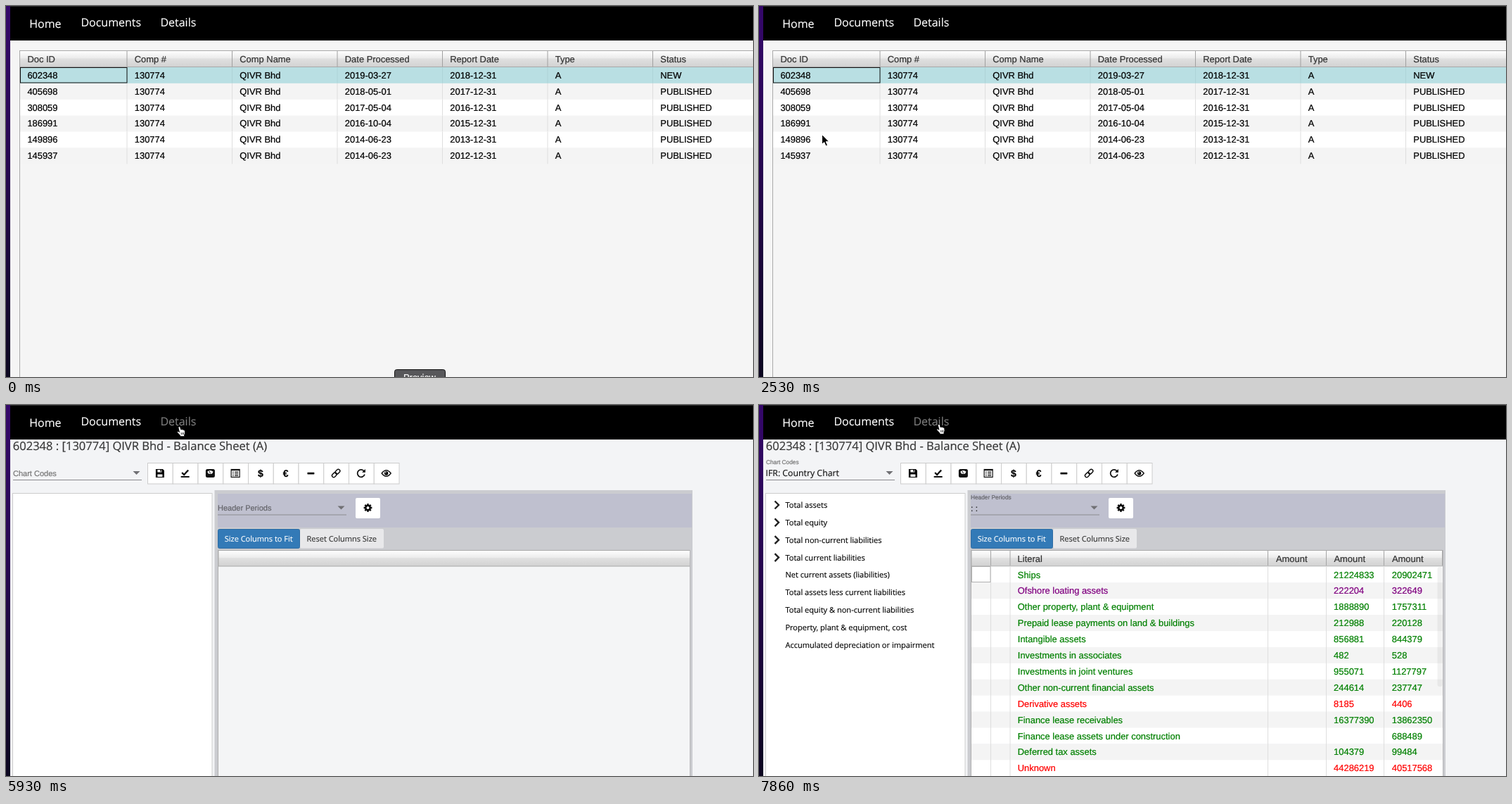
An HTML page that plays this animation: 1062 by 527 pixels, repeating every 8 s.

```html
<!DOCTYPE html>
<html lang="en">
<head>
<meta charset="utf-8">
<title>Document list</title>
<style>
html, body { margin: 0; width: 100%; height: 100%; overflow: hidden; background: #f5f5f5; }
svg { display: block; width: 1062px; height: 527px; }
text {
  font-family: "Liberation Sans", Arial, sans-serif; font-size: 12.92px; white-space: pre;
  color: #000; fill: currentColor; stroke: currentColor; stroke-width: .22px;
  text-rendering: geometricPrecision;
}
.o { font-family: "Open Sans", "Noto Sans", sans-serif; stroke-width: .15px; }
</style>
</head>
<body>
<svg id="stage" viewBox="0 0 1062 527" xmlns="http://www.w3.org/2000/svg">
  <defs>
    <linearGradient id="head" x2="0" y2="1">
      <stop offset="0" stop-color="#fff"/><stop offset=".45" stop-color="#ececec"/>
      <stop offset=".5" stop-color="#e0e0e0"/><stop offset="1" stop-color="#d2d2d2"/>
    </linearGradient>
    <linearGradient id="strip" x2="0" y2="1">
      <stop offset="0" stop-color="#35086a"/><stop offset=".45" stop-color="#26064f"/><stop offset="1" stop-color="#0c0620"/>
    </linearGradient>
  </defs>
  <g id="list"></g>
  <g id="details"></g>
  <g id="nav"></g>
  <path id="arrow" d="M0 0V14L3.2 11.1 5.5 16.4 8 15.3 5.7 10.2H10Z" fill="#000" stroke="#fff" stroke-width="1" stroke-linejoin="round"/>
  <g id="hand" stroke="#000" stroke-width=".9" stroke-linejoin="round">
    <path d="M3 1.2Q4.6 .2 5.2 2L6.1 5.2Q7.5 4.4 8.2 5.3 9.4 4.7 10 5.8 11.6 5.5 11.8 7.4L12 10.5 11 12.8V15H5.2L4.8 13.4 1.2 9.6Q.2 8.2 1.4 7.7 2.4 7.4 3.9 9L2.4 2.8Q2.2 1.6 3 1.2Z" fill="#fff"/>
    <path d="M6.4 9.5L6.8 12.5M8.3 9.3L8.5 12.4M10 9.2V12.2" fill="none" stroke-width=".7"/>
  </g>
</svg>
<script>
const $ = id => document.getElementById(id);
const LOOP = 8000, ROW = 22.9;
const COMPANY = "QIVR Bhd";

const rect = (x, y, w, h, fill, more = "") =>
  `<rect x="${x}" y="${y}" width="${w}" height="${h}" fill="${fill}" ${more}/>`;
const label = (x, y, s, more = "") =>
  `<text x="${x}" y="${y}" ${more}>${s.replace(/&/g, "&amp;")}</text>`;
const open = (x, y, s, size, color) => label(x, y, s, `class="o" style="font-size:${size}px;color:${color}"`);
const small = (x, y, s, size, color) => label(x, y, s, `style="font-size:${size}px;color:${color}"`);
const line = (x1, y1, x2, y2, color) => `<path d="M${x1} ${y1}L${x2} ${y2}" stroke="${color}"/>`;

function drawNav() {
  return rect(0, 0, 6, 527, "url(#strip)") + rect(6, 0, 1056, 49, "#000") + line(6, .5, 1062, .5, "#2c2c2c") +
    open(33.2, 31.2, "Home", 16, "#fff") + open(106.4, 29.3, "Documents", 16, "#fff") +
    `<g id="link">${open(219.4, 29.3, "Details", 16, "inherit")}</g>`;
}

function drawList() {
  const heads = ["Doc ID", "Comp #", "Comp Name", "Date Processed", "Report Date", "Type", "Status"];
  const docs = [
    ["602348", "2019-03-27", "2018-12-31"], ["405698", "2018-05-01", "2017-12-31"],
    ["308059", "2017-05-04", "2016-12-31"], ["186991", "2016-10-04", "2015-12-31"],
    ["149896", "2014-06-23", "2013-12-31"], ["145937", "2014-06-23", "2012-12-31"]
  ];
  const edge = i => i ? 22.5 + 149.5 * i : 19.5;
  const textX = i => i ? edge(i) + 10.8 : 30.4;
  let s = rect(6, 49, 1056, 478, "#f5f5f5") + rect(19.5, 63.5, 1050, 23, "url(#head)", 'stroke="#a9a9a9"');
  docs.forEach(([id, done, report], r) => {
    const y = 87 + ROW * r;
    s += rect(20, y, 1042, ROW, r ? (r % 2 ? "#f4f4f4" : "#fff") : "#b9dfe3");
    [id, "130774", COMPANY, done, report, "A", r ? "PUBLISHED" : "NEW"].forEach((v, c) => {
      if (c) s += line(edge(c), y, edge(c), y + ROW, r ? "#dedede" : "#aed3d7");
      s += label(textX(c), y + 15.7, v);
    });
  });
  heads.forEach((h, c) => {
    if (c) s += line(edge(c), 64, edge(c), 86, "#a0a0a0");
    s += label(textX(c), 80, h, 'style="color:#333"');
  });
  s += line(19.5, 63, 19.5, 527, "#a9a9a9");
  s += rect(20.5, 87.5, 151.5, 21.5, "none", 'id="focus"');
  s += `<g id="preview">${rect(552.5, 516.5, 72, 26, "#57575a", 'rx="3" stroke="#111"')}${label(565, 532, "Preview", 'style="color:#fff"')}</g>`;
  s += `<g id="ghost">${rect(107, 517, 118, 26, "#efefef")}${label(119, 533, "Select Chart", 'style="color:#f8f8f8;font-weight:bold"')}</g>`;
  return s;
}

function drawTools() {
  const sign = c => `<text text-anchor="middle" y="5" style="font-size:14px;font-weight:bold">${c}</text>`;
  const stroke = (d, w) => `<path d="${d}" fill="none" stroke="#111" stroke-width="${w}"/>`;
  const icons = [
    `<path fill-rule="evenodd" d="M-6-6H4L6-4V6H-6ZM-3.5-5V-1.5H2.5V-5ZM-3.5 1.5V5H3.5V1.5Z"/>` + rect(.3, -5, 1.5, 2.6, "#111"),
    stroke("M-4.5-1L-1.5 2 4.5-4.5", 2.4) + rect(-6, 4, 12, 2, "#111"),
    rect(-6.5, -6, 13, 12, "#111", 'rx="2.5"') + `<path d="M-4.2-2.2Q0-6 4.2-2.2L2.5.7H-2.5Z" fill="#fff"/>` + stroke("M0 0L-1.2-3", 1),
    rect(-6, -5.5, 12, 11, "#fff", 'stroke="#111" stroke-width="1.2"') + rect(-6, -6, 12, 2.2, "#111") +
      stroke("M-4-1.7H-2.5M-1-1.7H4M-4 .8H-2.5M-1 .8H4M-4 3.3H-2.5M-1 3.3H4", 1.2),
    sign("$"), sign("€"),
    rect(-5, -1.2, 10, 2.6, "#111", 'rx=".6"'),
    `<g transform="rotate(-45)">${rect(-7, -2.4, 7.5, 4.8, "none", 'rx="2.4" stroke="#111" stroke-width="1.5"')}${rect(-.5, -2.4, 7.5, 4.8, "none", 'rx="2.4" stroke="#111" stroke-width="1.5"')}</g>`,
    stroke("M4.2-3A5.2 5.2 0 1 0 5 1.5", 1.7) + `<path d="M6-6V-1.2H1.2Z"/>`,
    stroke("M-6.5 0Q0-8.5 6.5 0 0 8.5-6.5 0Z", 1.4) + `<circle r="2.7"/><circle cx="-.8" cy="-.9" r=".8" fill="#fff"/>`
  ];
  return icons.map((icon, i) => {
    const x = 201.5 + 35.75 * i;
    return rect(x, 82.5, 35.75, 29.5, "#fff", 'stroke="#ccc"') + `<g transform="translate(${x + 17.4} 97)">${icon}</g>`;
  }).join("");
}

const select = (x, y) => line(x, y + .5, x + 183, y + .5, "#8b8b8f") +
  `<path d="M${x + 170.5} ${y - 12}h10l-5 5z" fill="#707074"/>`;

function drawGear() {
  let s = "";
  for (let i = 0; i < 8; i++) s += rect(-1.3, -5.9, 2.6, 4, "#111", `transform="rotate(${i * 45})"`);
  return rect(497, 132, 35, 29, "#fff", 'rx="2"') +
    `<g transform="translate(514.5 146)">${s}<circle r="4.3"/><circle r="2" fill="#fff"/></g>`;
}

function drawTree() {
  return ["Total assets", "Total equity", "Total non-current liabilities", "Total current liabilities",
    "Net current assets (liabilities)", "Total assets less current liabilities",
    "Total equity & non-current liabilities", "Property, plant & equipment, cost",
    "Accumulated depreciation or impairment"].map((s, i) => {
    const y = 142 + 24.85 * i;
    return open(37.4, y + 4, s, 11.05, "#000") +
      (i < 4 ? `<path d="M22.5 ${y - 5.5}l5.5 5.5-5.5 5.5" fill="none" stroke="#222" stroke-width="2.4"/>` : "");
  }).join("");
}

function drawSheet() {
  const G = "#008000", P = "#800080", R = "#ff0000";
  const rows = [
    ["Ships", "21224833", "20902471", G], ["Ofshore loating assets", "222204", "322649", P],
    ["Other property, plant & equipment", "1888890", "1757311", G],
    ["Prepaid lease payments on land & buildings", "212988", "220128", G],
    ["Intangible assets", "856881", "844379", G], ["Investments in associates", "482", "528", G],
    ["Investments in joint ventures", "955071", "1127797", G],
    ["Other non-current financial assets", "244614", "237747", G], ["Derivative assets", "8185", "4406", R],
    ["Finance lease receivables", "16377390", "13862350", G],
    ["Finance lease assets under construction", "", "688489", G],
    ["Deferred tax assets", "104379", "99484", G], ["Unknown", "44286219", "40517568", R]
  ];
  const edges = [329.5, 357, 723.5, 806.5, 888.5];
  let s = "";
  rows.forEach(([name, a, b, color], r) => {
    const y = 229.5 + ROW * r, tint = `style="color:${color}"`;
    s += rect(302, y, 670, ROW, r % 2 ? "#f4f4f4" : "#fff") +
      label(367.8, y + 16, name, tint) + label(817.1, y + 16, a, tint) + label(899.8, y + 16, b, tint);
  });
  edges.forEach(x => s += line(x, 229, x, 527, "#dedede") + line(x, 207, x, 228, "#a5a5a5"));
  s += line(971.5, 207, 971.5, 228, "#a5a5a5");
  [["Literal", 367.6], ["Amount", 735], ["Amount", 817.5], ["Amount", 900]].forEach(([h, x]) =>
    s += label(x, 223, h, 'style="color:#333"'));
  return s + rect(302.5, 229.5, 26.5, 22, "#fff", 'stroke="#b0b0b0"') +
    rect(964.5, 230, 7, 170, "#000", 'rx="3" opacity=".05"');
}

function drawDetails() {
  return rect(6, 49, 1056, 478, "#f3f4f6") +
    open(9.8, 64.3, `602348 : [130774] ${COMPANY} - Balance Sheet (A)`, 16.55, "#333") +
    select(10, 106) + drawTools() +
    rect(9.5, 125.5, 283.5, 410, "#fff", 'stroke="#ccc"') +
    rect(296.5, 121, 679.5, 406, "#cbccd0") + rect(301, 126, 674, 48, "#bfc0cf") +
    select(301, 155.5) + drawGear() +
    rect(301.5, 176.5, 116, 27, "#337ab7", 'rx="2" stroke="#2e6da4"') + open(310.7, 193.7, "Size Columns to Fit", 11, "#fff") +
    rect(418, 176, 119, 27.5, "#e8e8ea", 'rx="2"') + open(427.5, 193.7, "Reset Columns Size", 11, "#333") +
    rect(302, 206, 671, 321, "#f4f5f6") + rect(302, 206.5, 670.5, 22.5, "url(#head)", 'stroke="#a9a9a9"') +
    line(301.5, 206, 301.5, 527, "#b0b0b0") + line(972.5, 206, 972.5, 527, "#b5b5b8") +
    `<g id="empty">${small(10, 100.7, "Chart Codes", 11, "#777")}${small(301, 150, "Header Periods", 11, "#66666c")}</g>` +
    `<g id="filled">${small(10, 84, "Chart Codes", 8.3, "#777")}${open(9.5, 100.8, "IFR: Country Chart", 12.3, "#111")}` +
    `${small(301, 133.5, "Header Periods", 8.3, "#66666c")}${small(301, 150.5, ": :", 12, "#222")}</g>` +
    `<g id="tree">${drawTree()}</g><g id="sheet">${drawSheet()}</g>`;
}

// Pointer stops: time, x, y. Each is held until the next.
const stops = [
  [1500, 281, 497], [1650, 214, 414], [1790, 145.5, 329.5], [1940, 120, 272], [2090, 106, 235], [2240, 97, 208],
  [2380, 92, 191], [2530, 89.5, 182.5], [2680, 74, 150], [2830, 58, 121], [2970, 51.5, 109], [3120, 54, 104],
  [3260, 62, 100], [3410, 69, 98], [4150, 76, 95], [4300, 100, 84], [4440, 136, 68], [4590, 176, 52],
  [4740, 212, 40], [4890, 233, 33], [5040, 240, 31], [5180, 242.6, 29.7], [7860, 252, 26.3]
];

function show(id, on) { $(id).style.display = on ? "" : "none"; }

function render(t) {
  const onLink = t >= 4740, page = t >= 5930, loaded = t >= 6070;
  const stop = stops.filter(s => s[0] <= t).pop();
  show("details", page);
  show("list", !page);
  show("preview", t < 1200);
  $("preview").style.opacity = t < 1050 ? 1 : .3;
  show("ghost", t >= 1500 && t < 1940);
  $("ghost").style.opacity = t < 1790 ? 1 : .8;
  $("focus").setAttribute("stroke", t < 5180 ? "#111" : "#9db8bb");
  $("link").style.color = onLink ? "#7d7d7d" : "#fff";
  show("empty", !loaded);
  show("filled", loaded);
  show("tree", t >= 6220);
  show("sheet", t >= 6370);
  show("arrow", stop && !onLink);
  show("hand", stop && onLink);
  if (stop) for (const id of ["arrow", "hand"]) $(id).setAttribute("transform", `translate(${stop[1]} ${stop[2]})`);
}

$("list").innerHTML = drawList();
$("details").innerHTML = drawDetails();
$("nav").innerHTML = drawNav();

const start = performance.now();
function tick() {
  render((performance.now() - start) % LOOP);
  requestAnimationFrame(tick);
}
render(0);
requestAnimationFrame(tick);
</script>
</body>
</html>
```
